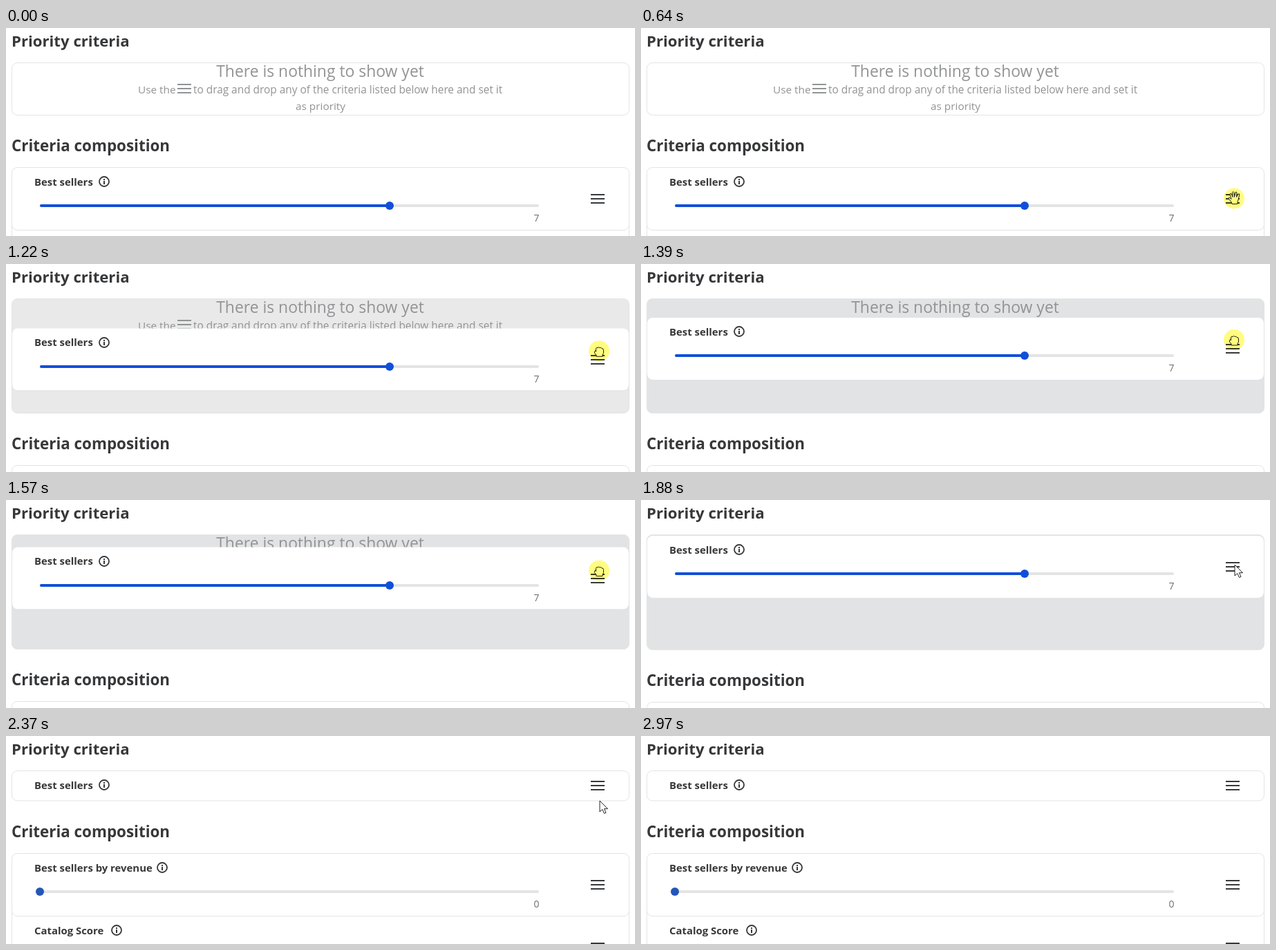
Write an HTML page with a canvas that moves like this. It is 910 px wide and 302 px high and loops after 5.09 s.

```html
<!DOCTYPE html>
<html lang="en">
<head>
<meta charset="utf-8">
<title>Criteria drag and drop</title>
<style>
html, body { margin: 0; width: 100%; height: 100%; overflow: hidden; background: #fff; }
canvas { display: block; }
</style>
</head>
<body>
<canvas id="stage" width="910" height="302"></canvas>
<script>
const ctx = document.getElementById('stage').getContext('2d');
const LOOP = 5090;
const FONT = '"Open Sans", "Noto Sans", sans-serif';
const INK = '#37383a', MUTED = '#929394', LINE = '#e3e4e4', BLUE = '#124fd8';
const LEFT = 8.5, RIGHT = 901.5, RADIUS = 8, LIST_TOP = 202.5;
const CARD = 91, FOLDED = 43;

// The picture is refreshed in bursts: first time, last time, count
const bursts = [[0, 0, 1], [50, 330, 6], [490, 490, 1], [640, 960, 7], [960, 1160, 5],
  [1220, 1390, 4], [1390, 1680, 7], [1840, 1880, 2], [1880, 2210, 7],
  [2270, 2370, 2], [2870, 2970, 3]];
const ticks = bursts.flatMap(([a, b, n]) =>
  Array.from({ length: n }, (_, i) => n > 1 ? a + (b - a) * i / (n - 1) : a));

const hands = {
  arrow: new Path2D('M0 0V16L3.8 12.5 6.5 18.5 9 17.4 6.5 11.7H11.5Z'),
  open: new Path2D('M-3 8L-4 5-8 0Q-8-2-6-1L-4 1-6-6Q-5.5-8-4-7L-2-2-2.5-9Q-1.5-11-.2-9L.5-2 2-9Q3.5-10 4-8.5L3.5-2 6-6.5Q8-7.5 7.8-5.5L6 2 5 5V8Z'),
  closed: new Path2D('M-4 8V6L-6.5 3Q-7.5 0-5-.5L-4.5 1V-3Q-4-6-2-4.5Q-.5-6.5 1-4.5Q3-6 4-3.5Q6.5-4 6.5-1V3L5 6V8Z')
};

const cursorX = [[50, 903], [330, 858], [1680, 858], [1840, 859]];
const cursorY = [[50, 247], [330, 247], [640, 247.5], [750, 239], [960, 183.5],
  [1160, 132], [1390, 110], [1680, 95], [1840, 94]];
const cardShift = [[640, 0], [750, -6], [960, -47], [1160, -104], [1390, -125],
  [1680, -144], [1840, -147], [1880, -151], [1935, -152]];
const zoneTint = [[1060, 0], [1270, 1]];

function track(keys, t) {
  if (t <= keys[0][0]) return keys[0][1];
  for (let i = 1; i < keys.length; i++) {
    const [t0, v0] = keys[i - 1], [t1, v1] = keys[i];
    if (t < t1) return v0 + (v1 - v0) * (t - t0) / (t1 - t0);
  }
  return keys[keys.length - 1][1];
}

function text(str, x, y, size, weight, color, align = 'left') {
  ctx.font = `${weight} ${size}px ${FONT}`;
  ctx.fillStyle = color;
  ctx.textAlign = align;
  ctx.fillText(str, x, y);
}

function box(x, y, w, h, r, color) {
  ctx.beginPath();
  ctx.roundRect(x, y, w, h, r);
  ctx.fillStyle = color;
  ctx.fill();
}

function disc(x, y, r, color) {
  ctx.beginPath();
  ctx.arc(x, y, r, 0, Math.PI * 2);
  ctx.fillStyle = color;
  ctx.fill();
}

function frame(y, h, fill, alpha = 1) {
  ctx.beginPath();
  ctx.roundRect(LEFT, y, RIGHT - LEFT, h, RADIUS);
  if (fill) {
    ctx.globalAlpha = alpha;
    ctx.fillStyle = fill;
    ctx.fill();
    ctx.globalAlpha = 1;
  }
  ctx.strokeStyle = LINE;
  ctx.lineWidth = 1;
  ctx.stroke();
}

function bottomEdge(y) {
  ctx.beginPath();
  ctx.moveTo(LEFT, y - RADIUS);
  ctx.arcTo(LEFT, y, LEFT + RADIUS, y, RADIUS);
  ctx.lineTo(RIGHT - RADIUS, y);
  ctx.arcTo(RIGHT, y, RIGHT, y - RADIUS, RADIUS);
  ctx.strokeStyle = LINE;
  ctx.lineWidth = 1;
  ctx.stroke();
}

function grip(x, y, color) {
  ctx.fillStyle = color;
  for (const d of [-6, 0, 6]) ctx.fillRect(x, Math.round(y + d) - 1, 20, 2);
}

function info(x, y) {
  ctx.beginPath();
  ctx.arc(x, y, 7, 0, Math.PI * 2);
  ctx.strokeStyle = INK;
  ctx.lineWidth = 1.8;
  ctx.stroke();
  ctx.fillStyle = INK;
  ctx.fillRect(x - 1, y - 4, 2, 2);
  ctx.fillRect(x - 1, y - 1, 2, 5);
}

const best = { name: 'Best sellers', infoX: 142, value: 7 };
const revenue = { name: 'Best sellers by revenue', infoX: 226, value: 0 };
const score = { name: 'Catalog Score', infoX: 160, value: 0 };

function header(item, top) {
  text(item.name, 41, top + 26.3, 14.9, 700, INK);
  info(item.infoX, Math.round(top + 20.5));
}

function criterion(item, top, knob = BLUE) {
  header(item, top);
  const y = Math.round(top + 55.5), x = Math.ceil(49 + 722 * item.value / 10);
  box(49, y - 2, 722, 4, 2, '#e3e4e4');
  if (item.value) box(49, y - 2, x - 49, 4, 2, BLUE);
  disc(x, y, 6, knob);
  text(item.value, 771.5, top + 78.5, 14, 400, '#6c6e6c', 'right');
  grip(846, top + 45.5, INK);
  bottomEdge(top + CARD);
}

function folded(item, top) {
  header(item, top);
  grip(846, top + 21.5, INK);
}

function list(top, items, knob, withFolded) {
  text('Criteria composition', 8, top - 23.7, 22.4, 700, INK);
  frame(top, 400);
  if (withFolded) {
    folded(best, top);
    top += FOLDED;
    bottomEdge(top);
  }
  for (const item of items) {
    criterion(item, top, knob);
    top += CARD;
  }
}

function emptyText() {
  text('There is nothing to show yet', 454.5, 71, 22.9, 400, MUTED, 'center');
  text('Use the', 191, 95, 15.35, 400, MUTED);
  grip(248, 88, MUTED);
  text('to drag and drop any of the criteria listed below here and set it', 271, 95, 15.4, 400, MUTED);
  text('as priority', 455, 119, 15.35, 400, MUTED, 'center');
}

function cursor(t) {
  if (t < 50 || t >= 2970) return;
  const x = track(cursorX, t), y = track(cursorY, t);
  const shape = t >= 1840 || x > 868 ? 'arrow' : t < 690 ? 'open' : 'closed';
  ctx.save();
  ctx.globalAlpha = t < 2870 ? 1 : t < 2920 ? 0.66 : 0.33;
  ctx.translate(x, y);
  ctx.fillStyle = '#fff';
  ctx.strokeStyle = '#222';
  ctx.lineWidth = 1;
  ctx.lineJoin = 'round';
  ctx.fill(hands[shape]);
  ctx.stroke(hands[shape]);
  if (t >= 490 && t < 1840) {
    ctx.globalCompositeOperation = 'multiply';
    disc(0, 0, 15, '#fffc80');
  }
  ctx.restore();
}

function draw(t) {
  ctx.fillStyle = '#fff';
  ctx.fillRect(0, 0, 910, 302);
  text('Priority criteria', 8, 27, 22.2, 700, INK);

  const dropped = t >= 2150, done = t >= 2270, dragging = t >= 640 && !dropped;
  const grow = t < 1220 || dropped ? 0 : t < 1840 ? 90 : 91;
  const tint = t < 2370 ? track(zoneTint, t) : 0;
  frame(50.5, done ? 43.5 : 76 + grow, '#e2e3e4', tint);

  if (done) {
    folded(best, 50.5);
    list(170.5, [revenue, score], '#2457b6');
  } else {
    emptyText();
    if (dropped) list(LIST_TOP, [revenue], '#2457b6', true);
    else list(LIST_TOP + grow, dragging && t > 690 ? [revenue, score] : [best, revenue]);
  }
  if (dragging && t > 690) {
    const top = LIST_TOP + track(cardShift, t);
    box(LEFT + 0.5, top + 0.5, RIGHT - LEFT - 1, CARD - 1, RADIUS, '#fff');
    criterion(best, top);
  }
  cursor(t);
}

const start = performance.now();
function loop() {
  const t = (performance.now() - start) % LOOP;
  let held = 0;
  for (const tick of ticks) if (tick <= t) held = tick;
  draw(held);
  requestAnimationFrame(loop);
}
loop();
</script>
</body>
</html>
```
